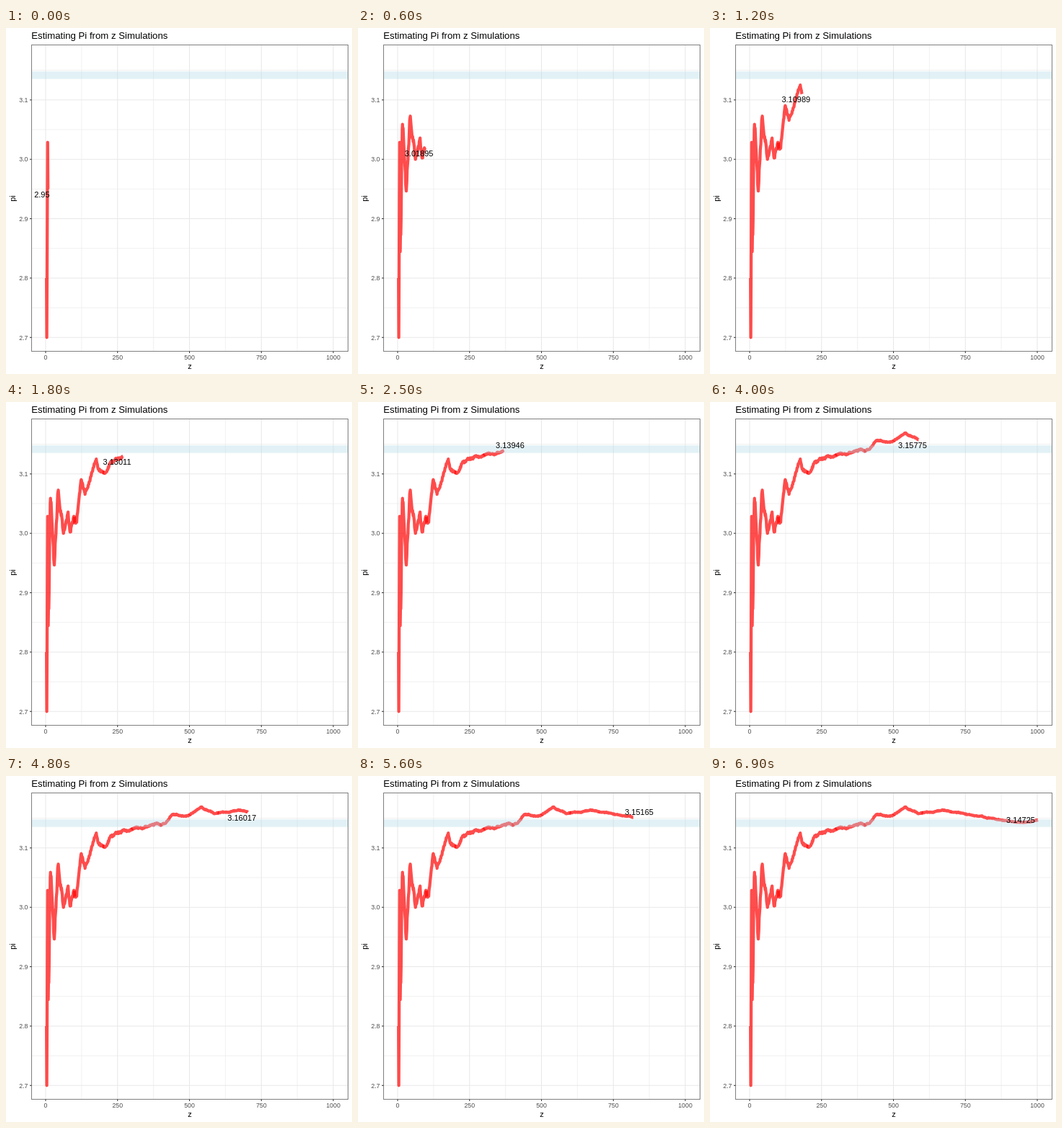
Write an HTML page that moves like this. It is 480 px wide and 480 px high and loops after 10 s.

```html
<!DOCTYPE html>
<html lang="en">
<head>
<meta charset="utf-8">
<title>Estimating Pi</title>
<style>
html, body { margin: 0; width: 100%; height: 100%; overflow: hidden; background: #fff; }
svg { display: block; width: 100%; height: 100%; font-family: "Liberation Sans", Arial, sans-serif; }
.tick { font-size: 8.8px; fill: #4d4d4d; }
.axis { font-size: 11px; text-anchor: middle; }
#runs { fill: none; stroke: #f00; stroke-width: 4.27; stroke-opacity: .7; stroke-linejoin: round; }
</style>
</head>
<body>
<svg viewBox="0 0 480 480">
  <rect width="480" height="480" fill="#fff"/>
  <g id="grid"></g>
  <g id="runs"></g>
  <rect x="35.5" y="60.2" width="439" height="10.5" fill="#add8e6" fill-opacity=".35"/>
  <text id="label" class="axis"></text>
  <rect x="35.5" y="23.5" width="439" height="425" fill="none" stroke="#7f7f7f"/>
  <g id="axes"></g>
  <text x="35.3" y="15" font-size="13.2">Estimating Pi from z Simulations</text>
  <text class="axis" x="255" y="473">z</text>
  <text class="axis" transform="translate(13 236.5) rotate(-90)">pi</text>
</svg>
<script>
const $ = id => document.getElementById(id);
const STEP = 100, LAST = 69, LOOP = 10000, ZMIN = 3, ZMAX = 1001, RUN = 100;
const px = z => 55 + 0.399 * z;
const py = p => 99.8 - (p - 3.1) * 823.75;

function add(parent, tag, attrs, text = '') {
  const el = document.createElementNS('http://www.w3.org/2000/svg', tag);
  for (const name in attrs) el.setAttribute(name, attrs[name]);
  el.textContent = text;
  return parent.appendChild(el);
}

function line(parent, x1, y1, x2, y2, color, width) {
  add(parent, 'line', { x1, y1, x2, y2, stroke: color, 'stroke-width': width });
}

function drawAxes() {
  const grid = $('grid'), axes = $('axes');
  const vertical = (z, w) => line(grid, px(z), 23.5, px(z), 448.5, '#e8e8e8', w);
  const horizontal = (p, w) => line(grid, 35.5, py(p), 474.5, py(p), '#e8e8e8', w);
  for (let i = 0; i < 4; i++) vertical(125 + 250 * i, 0.6);
  for (let i = 0; i < 5; i++) horizontal(2.75 + i / 10, 0.6);
  for (let i = 0; i < 5; i++) {
    const z = 250 * i, p = 2.7 + i / 10;
    vertical(z, 1.07);
    horizontal(p, 1.07);
    line(axes, px(z), 448.5, px(z), 451, '#333', 1.07);
    line(axes, 33, py(p), 35.5, py(p), '#333', 1.07);
    add(axes, 'text', { class: 'tick', x: px(z), y: 460, 'text-anchor': 'middle' }, z);
    add(axes, 'text', { class: 'tick', x: 30.5, y: py(p) + 3.2, 'text-anchor': 'end' }, p.toFixed(1));
  }
}

// Main turning points: [z, thousandths above 3].
const knots = [
  [3, -200], [4, -300], [7, 29], [8, -50], [9, -156], [17, 59], [30, -53], [43, 70],
  [62, 0], [78, 34], [85, 3], [100, 29], [101, 19], [108, 20], [123, 89], [137, 67],
  [176, 125], [182, 109.9], [211, 103], [230, 121], [266, 129], [370, 139.5], [414, 141],
  [440, 156], [495, 154], [540, 169], [587, 157.8], [670, 164], [703, 160.2],
  [819, 151.7], [940, 143], [1001, 147.2]
];

let seed = 31;
const random = () => (seed = (seed * 16807) % 2147483647) / 2147483647;

// A random walk tied down at each turning point; its steps shrink as z grows.
// Estimates are whole multiples of 0.4 / z.
function simulate() {
  const est = [];
  for (let i = 1; i < knots.length; i++) {
    const [z0, v0] = knots[i - 1], [z1, v1] = knots[i];
    const walk = [0];
    for (let z = z0 + 1; z <= z1; z++)
      walk.push(walk[walk.length - 1] + (random() - 0.5) * 500 / z);
    const drift = v1 - v0 - walk[walk.length - 1];
    walk.forEach((w, j) => {
      const z = z0 + j, v = v0 + w + drift * j / (z1 - z0);
      est[z] = Math.round((3 + v / 1000) * z / 0.4) * 0.4 / z;
    });
  }
  return est;
}

drawAxes();
const est = simulate();
const runs = Array.from({ length: 10 }, () => add($('runs'), 'polyline', { points: '' }));
const label = $('label');
let shown = -1;

function draw(time) {
  const k = Math.min(LAST, Math.floor(time % LOOP / STEP));
  if (k === shown) return;
  shown = k;
  const tip = Math.min(ZMAX, Math.round(8 + 14.475 * k));

  // Neighbouring runs share one step, which shows darker.
  runs.forEach((run, i) => {
    const points = [];
    const stop = Math.min(tip, RUN * (i + 1) + 1);
    for (let z = Math.max(ZMIN, RUN * i); z <= stop; z++)
      points.push(px(z).toFixed(2) + ',' + py(est[z]).toFixed(2));
    run.setAttribute('points', points.join(' '));
  });

  // The label hops between both sides of the tip and stays clear of the right edge.
  const hop = k * 6 % 17;
  const side = hop > 7 && hop < 15 ? 1 : -1;
  const x = px(tip) + 8.3 * side, limit = 431;
  label.setAttribute('x', Math.min(x, limit));
  label.setAttribute('y', py(est[tip]) + 4 - (x > limit ? 0 : 7.7 * side));
  label.textContent = +est[tip].toFixed(5);
}

const start = performance.now();
function tick() {
  draw(performance.now() - start);
  requestAnimationFrame(tick);
}
draw(0);
requestAnimationFrame(tick);
</script>
</body>
</html>
```
